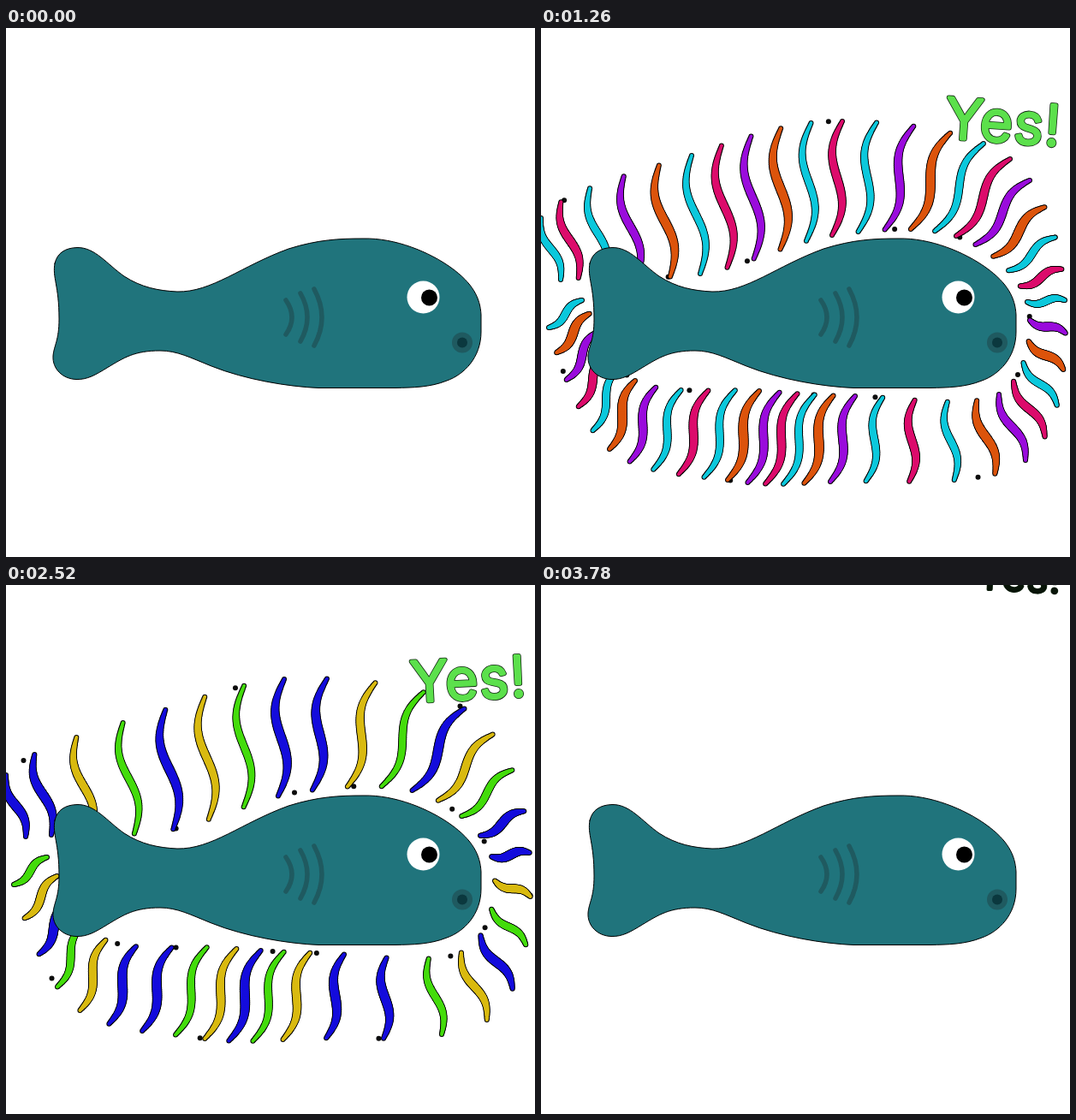
An HTML page with a canvas for the animation above (3.92 s loop, 618x618 px).

```html
<!DOCTYPE html>
<html lang="en">
<head>
<meta charset="utf-8">
<title>Yes fish</title>
<style>
  html, body { margin: 0; width: 618px; height: 618px; overflow: hidden; background: #fff; }
  canvas { display: block; }
</style>
</head>
<body>
<canvas id="stage" width="618" height="618"></canvas>
<script>
const ctx = document.getElementById('stage').getContext('2d');
const STEP = 140, STEPS = 28;

// Two closed rings around the fish: squiggles run from the inner to the outer one
const inner = [[23, 294], [186, 287], [340, 242], [485, 243], [568, 320],
  [535, 428], [367, 430], [255, 424], [110, 412], [48, 318]];
const outer = [[0, 222], [176, 149], [352, 109], [548, 153], [612, 318],
  [566, 505], [338, 530], [218, 528], [80, 492], [9, 350]];

const cyan = { color: '#0cc8dc', width: 7 };
const magenta = { color: '#dc0c6c', width: 8 };
const purple = { color: '#9a0cdc', width: 8 };
const orange = { color: '#dc540c', width: 9 };
const blue = { color: '#140cdc', width: 9 };
const gold = { color: '#d9ba10', width: 8 };
const green = { color: '#44dc0c', width: 7 };

const opening = { tilt: 1, crumbs: 0, lines: ring(10, 0.94, [gold], 0.1) };
const warm = { tilt: 4, crumbs: 16,
  lines: ring(46, 1, [cyan, magenta, cyan, purple, orange, cyan, magenta, purple, orange], 0.065) };
const cool = { tilt: -3, crumbs: 20,
  lines: ring(35, 1, [blue, blue, gold, green, blue, gold, green], 0.065) };
const closing = { tilt: 8, crumbs: 9,
  lines: [...warm.lines, ...cool.lines].filter(l => l.ink === cyan || l.ink === green) };

const body = new Path2D('M57 275C60 262 70 257 83 256.5C104 256 118 276 138 290' +
  'C158 303 178 307 200 308C240 309 275 278 330 258C365 247 390 246 417 246' +
  'C455 245 495 262 520 280C545 298 554 315 555 335V355C555 385 535 405 515 412' +
  'C495 420 475 420 455 420.5H365C330 419 280 411 240 395C215 385 200 377 180 377' +
  'C150 377 138 385 118 397C105 405 95 411 82 410.5C66 410 54 398 55 383' +
  'C56 371 62 365 62 340C62 300 54 292 57 275Z');
const gills = new Path2D('M327 318Q341 338 327 358M344 310Q360 338 344 366M360 305Q378 338 360 371');

// Catmull-Rom point on a closed ring, u counted in key points
function onRing(keys, u) {
  const i = Math.floor(u), t = u - i, n = keys.length;
  const [a, b, c, d] = [-1, 0, 1, 2].map(k => keys[(i + k + n) % n]);
  return [0, 1].map(k => b[k] + t / 2 * (c[k] - a[k] +
    t * (2 * a[k] - 5 * b[k] + 4 * c[k] - d[k] + t * (3 * (b[k] - c[k]) + d[k] - a[k]))));
}

function ring(count, span, inks, sway) {
  return Array.from({ length: count }, (_, i) => {
    const u = 9 * span * i / (count - 1);
    return { from: onRing(inner, u), to: onRing(outer, u), ink: inks[i % inks.length], sway };
  });
}

function disc(x, y, r, color) {
  ctx.fillStyle = color;
  ctx.beginPath();
  ctx.arc(x, y, r, 0, Math.PI * 2);
  ctx.fill();
}

function drawFish() {
  ctx.fillStyle = '#20747c';
  ctx.fill(body);
  ctx.strokeStyle = '#000';
  ctx.lineWidth = 1;
  ctx.stroke(body);
  ctx.strokeStyle = '#1f5a60';
  ctx.lineWidth = 5.5;
  ctx.stroke(gills);
  disc(487.5, 314.5, 19, '#fff');
  disc(494.5, 315, 9.5, '#000');
  disc(533, 367.5, 12, '#1f5a60');
  disc(533, 367.5, 6, '#0b383e');
}

// A wavy brush stroke, thickest halfway along
function squiggle({ from: [x, y], to, ink, sway }) {
  const dx = to[0] - x, dy = to[1] - y;
  for (const [edge, color] of [[1, '#000'], [0, ink.color]]) {
    for (let t = 0; t <= 1; t += 1 / 64) {
      const wave = -sway * Math.sin(2 * Math.PI * t);
      const radius = 2 + (ink.width / 2 - 1.5) * Math.sin(Math.PI * t);
      disc(x + dx * t + dy * wave, y + dy * t - dx * wave, radius + edge, color);
    }
  }
}

function drawBurst({ lines, crumbs }) {
  for (let i = 0; i < crumbs; i++)
    disc(...onRing(i % 3 ? inner : outer, 9 * (i + 0.4) / crumbs), 3, '#0c0c0c');
  lines.forEach(squiggle);
}

function drawYes(x, y, degrees, scale, color) {
  ctx.save();
  ctx.translate(x, y);
  ctx.rotate(degrees * Math.PI / 180);
  ctx.scale(scale, scale);
  ctx.font = '300 62px Inter, sans-serif';
  ctx.letterSpacing = '2px';
  ctx.textAlign = 'center';
  for (const [width, ink] of [[5, '#142814'], [3.5, color]]) {
    ctx.strokeStyle = ink;
    ctx.lineWidth = width;
    ctx.strokeText('Yes!', 0, 22);
  }
  ctx.fillStyle = color;
  ctx.fillText('Yes!', 0, 22);
  ctx.restore();
}

function burstAt(step) {
  if (step < 4 || step > 21) return null;
  if (step < 6) return opening;
  if (step === 6 || step > 19) return closing;
  return step % 2 ? warm : cool;
}

function draw(step) {
  ctx.fillStyle = '#fff';
  ctx.fillRect(0, 0, 618, 618);
  ctx.lineCap = ctx.lineJoin = 'round';
  const burst = burstAt(step);
  if (burst) drawBurst(burst);
  drawFish();
  if (burst) {
    const grown = burst === opening ? 0 : 1;
    drawYes(536 + 5 * grown, 112 - 2 * grown, burst.tilt, 1 + 0.05 * grown, '#5ce04c');
  } else if (step > 21) {
    const exit = Math.max(0, step - 23) / 4;
    drawYes(541 + 18 * exit, 110 - 120 * exit, closing.tilt - 5 * exit, 1.05 - 0.28 * exit,
      exit < 1 ? '#5ce04c' : '#081408');
  }
}

let shown = -1;
function tick() {
  const step = Math.floor(performance.now() / STEP) % STEPS;
  if (step !== shown) draw(shown = step);
  requestAnimationFrame(tick);
}
tick();
</script>
</body>
</html>
```
